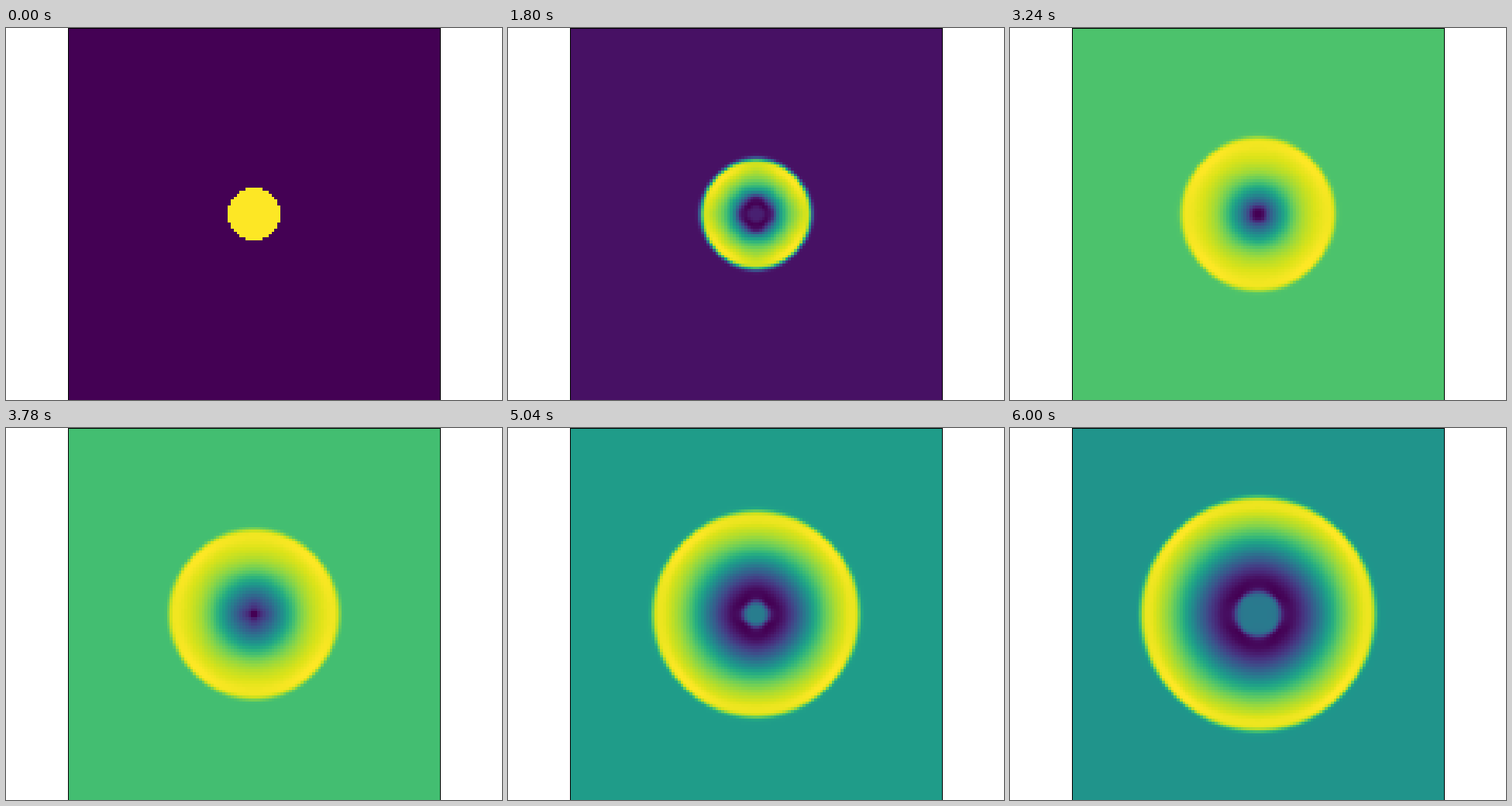
Recreate the animation shown at these times as an HTML page with a canvas. Size 640 by 480 pixels, loop 6060 ms.

```html
<!DOCTYPE html>
<html lang="en">
<head>
<meta charset="utf-8">
<title>Radial dam break</title>
<style>
  html, body { margin: 0; width: 100%; height: 100%; overflow: hidden; background: #fff; }
  canvas { display: block; }
</style>
</head>
<body>
<canvas id="stage" width="640" height="480"></canvas>
<script>
// Shallow water: a round column of depth 2 collapses into still water of depth 1.
// By symmetry only one quadrant is solved; it is mirrored when drawn.
const HALF = 64, SIZE = 2 * HALF;
const RADIUS = 0.07 * SIZE;
const RATIO = 0.002 * SIZE;        // time step / cell width, gravity = 1
const FRAME_MS = 60, FRAMES = 101;

const VIRIDIS = ('440154 481567 482677 453781 404788 39568c 33638d 2d708e 287d8e 238a8d ' +
  '1f968b 20a387 29af7f 3cbb75 55c667 73d055 95d840 b8de29 dce319 fde725')
  .split(' ').map(hex => [0, 2, 4].map(i => parseInt(hex.slice(i, i + 2), 16)));

const palette = Array.from({ length: 256 }, (_, level) => {
  const x = level / 255 * (VIRIDIS.length - 1);
  const i = Math.min(Math.floor(x), VIRIDIS.length - 2);
  return VIRIDIS[i].map((a, k) => Math.round(a + (VIRIDIS[i + 1][k] - a) * (x - i)));
});

const depth = new Float64Array(HALF * HALF).map((_, n) =>
  Math.hypot(n % HALF + 0.5, Math.floor(n / HALF) + 0.5) < RADIUS ? 2 : 1);
const momX = new Float64Array(HALF * HALF);
const momY = new Float64Array(HALF * HALF);

// Roe solver: the three waves between two states [depth, normal, transverse momentum]
function riemann(l, r) {
  const a = Math.sqrt(l[0]), b = Math.sqrt(r[0]);
  const u = (l[1] / a + r[1] / b) / (a + b);
  const v = (l[2] / a + r[2] / b) / (a + b);
  const c = Math.sqrt((l[0] + r[0]) / 2);
  const dh = r[0] - l[0], dp = r[1] - l[1], dq = r[2] - l[2];
  const left = ((u + c) * dh - dp) / (2 * c);
  const right = (dp - (u - c) * dh) / (2 * c);
  return [
    { speed: u - c, jump: [left, left * (u - c), left * v] },
    { speed: u, jump: [0, 0, dq - v * dh] },
    { speed: u + c, jump: [right, right * (u + c), right * v] }
  ];
}

const dot = (a, b) => a[0] * b[0] + a[1] * b[1] + a[2] * b[2];

// Monotonized-central limiter
function limiter(wave, upwind) {
  const norm = dot(wave, wave);
  if (norm < 1e-28) return 0;
  const theta = dot(upwind, wave) / norm;
  return Math.max(0, Math.min((1 + theta) / 2, 2, 2 * theta));
}

// One high-resolution step along all lines of one direction
function sweep(normal, transverse, stride, lineStride) {
  const fields = [depth, normal, transverse];
  for (let line = 0; line < HALF; line++) {
    const cells = [];
    for (let i = -2; i < HALF + 2; i++) {
      const inside = i < 0 ? -1 - i : Math.min(i, HALF - 1);
      const n = line * lineStride + inside * stride;
      cells.push([depth[n], i < 0 ? -normal[n] : normal[n], transverse[n]]);
    }
    const edges = cells.slice(1).map((cell, i) => riemann(cells[i], cell));
    for (let e = 1; e <= HALF + 1; e++) {
      const n = line * lineStride + (e - 1) * stride;
      for (let w = 0; w < 3; w++) {
        const { speed, jump } = edges[e][w];
        const upwind = edges[speed > 0 ? e - 1 : e + 1][w].jump;
        const size = Math.abs(speed);
        const correction = 0.5 * size * (1 - size * RATIO) * limiter(jump, upwind);
        for (let k = 0; k < 3; k++) {
          if (e > 1) fields[k][n - stride] -= RATIO * (Math.min(speed, 0) + correction) * jump[k];
          if (e <= HALF) fields[k][n] -= RATIO * (Math.max(speed, 0) - correction) * jump[k];
        }
      }
    }
  }
}

const history = [depth.slice()];
function depthAt(frame) {
  while (history.length <= frame) {
    sweep(momX, momY, 1, HALF);
    sweep(momY, momX, HALF, 1);
    history.push(depth.slice());
  }
  return history[frame];
}

const ctx = document.getElementById('stage').getContext('2d');
const grid = document.createElement('canvas');
grid.width = grid.height = SIZE;
const gridCtx = grid.getContext('2d');
const image = gridCtx.createImageData(SIZE, SIZE);

function draw(frame) {
  const field = depthAt(frame);
  const low = Math.min(...field), high = Math.max(...field);
  const fold = i => i < HALF ? HALF - 1 - i : i - HALF;
  for (let y = 0; y < SIZE; y++) {
    for (let x = 0; x < SIZE; x++) {
      const value = (field[fold(y) * HALF + fold(x)] - low) / (high - low);
      const color = palette[Math.min(255, Math.floor(value * 256))];
      image.data.set([...color, 255], 4 * (y * SIZE + x));
    }
  }
  gridCtx.putImageData(image, 0, 0);

  ctx.fillStyle = '#fff';
  ctx.fillRect(0, 0, 640, 480);
  ctx.imageSmoothingEnabled = false;
  ctx.drawImage(grid, 80, 0, 480, 480);
  ctx.fillStyle = '#000';
  ctx.fillRect(80, 0, 481, 1);
  ctx.fillRect(80, 0, 1, 480);
  ctx.fillRect(560, 0, 1, 480);
}

let shown = -1;
function tick() {
  const frame = Math.floor(performance.now() / FRAME_MS) % FRAMES;
  if (frame !== shown) draw(shown = frame);
  requestAnimationFrame(tick);
}
tick();
</script>
</body>
</html>
```
